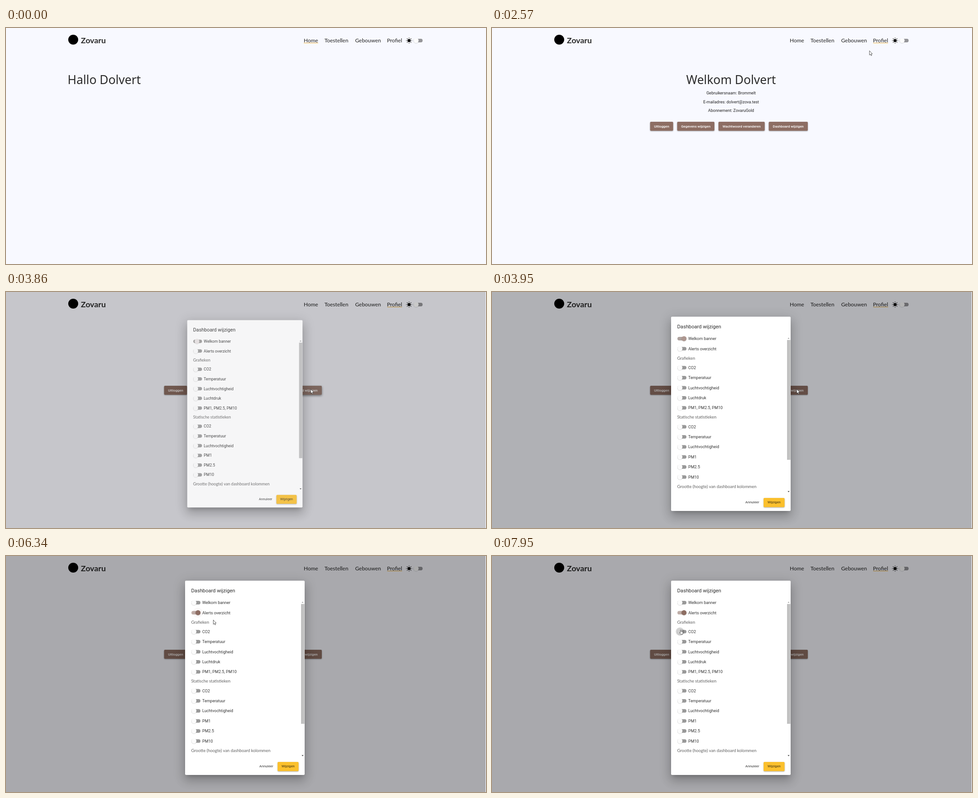
Write an HTML page with a canvas that moves like this. It is 1064 px wide and 526 px high and loops after 8 s.

```html
<!DOCTYPE html>
<html lang="nl">
<head>
<meta charset="utf-8">
<title>Dashboard wijzigen</title>
<style>
html, body { margin: 0; width: 100%; height: 100%; overflow: hidden; background: #f8f9ff; }
canvas { display: block; }
</style>
</head>
<body>
<canvas id="stage" width="1064" height="526"></canvas>
<script>
const ctx = document.getElementById('stage').getContext('2d');
const LOOP = 8000;
const BROWN = [141, 110, 99];
const YELLOW = '#fbc02d';
const SANS = 'Roboto, sans-serif';
const ROUND = 'Lato, sans-serif';
const HEAD = '"Noto Sans", sans-serif';

// Bursts of movement: start, end, number of steps
const BURSTS = [
  [500, 1300, 11], [1380, 1950, 8], [2320, 2320, 1], [2570, 3340, 10], [3680, 4470, 10],
  [4560, 4920, 5], [5110, 5700, 8], [5880, 6610, 10], [6700, 7450, 10], [7510, 7950, 6]
];
const PAGE_AT = 2320, PRESS_AT = 3680, DIALOG_AT = 3771;

// Pointer path: time, x, y
const PATH = [
  [500, 583, 507], [1300, 808, 83], [1380, 820, 64], [1950, 853, 33], [2490, 853, 33],
  [3340, 675, 216], [3950, 675, 216], [4470, 503, 154], [4920, 422, 99], [5280, 422, 99],
  [5700, 420, 121], [5960, 420, 121], [6280, 459, 142], [6610, 461, 148],
  [7450, 421, 175], [7770, 418, 164], [LOOP, 418, 164]
];
const ARROW = new Path2D('M0 0V9.6L2.2 7.6L3.7 11L5.2 10.3L3.8 7.1L6.4 6.8Z');
const HAND = new Path2D('M-1 .8q1-1.4 2 0V4l3 .8q1 .4 1 1.4L4.2 10H.2L-2.8 6.6q-.2-1.2 1.8-.4Z');

const clamp = v => Math.max(0, Math.min(1, v));
const lerp = (a, b, k) => a + (b - a) * k;
const mix = (a, b, k) => a.map((v, i) => Math.round(lerp(v, b[i], k)));
const rgb = (c, a = 1) => `rgba(${c.join(',')},${a})`;

function bezier(x1, y1, x2, y2) {
  const at = (a, b, s) => 3 * s * (1 - s) ** 2 * a + 3 * s * s * (1 - s) * b + s ** 3;
  return x => {
    let lo = 0, hi = 1;
    for (let i = 0; i < 24; i++) {
      const mid = (lo + hi) / 2;
      if (at(x1, x2, mid) < x) lo = mid; else hi = mid;
    }
    return at(y1, y2, lo);
  };
}
const easeFade = bezier(.25, .8, .25, 1);
const easeOpen = bezier(0, 0, .2, 1);

function snap(t) {
  let now = 0;
  for (const [a, b, n] of BURSTS) {
    if (t < a) break;
    const step = n > 1 ? (b - a) / (n - 1) : 1;
    now = Math.min(b, a + Math.floor((t - a) / step + .001) * step);
  }
  return now;
}

function text(str, x, y, font, color = '#212121', align = 'left') {
  ctx.font = font;
  ctx.fillStyle = color;
  ctx.textAlign = align;
  ctx.fillText(str, x, y);
}

function disc(x, y, r, color) {
  ctx.fillStyle = color;
  ctx.beginPath();
  ctx.arc(x, y, r, 0, 7);
  ctx.fill();
}

function box(x, y, w, h, r, color) {
  ctx.fillStyle = color;
  ctx.beginPath();
  ctx.roundRect(x, y, w, h, r);
  ctx.fill();
}

function withShadow(dy, blur, alpha, draw) {
  ctx.save();
  ctx.shadowColor = `rgba(0,0,0,${alpha})`;
  ctx.shadowOffsetY = dy;
  ctx.shadowBlur = blur;
  draw();
  ctx.restore();
}

// k: thumb position, tint: colour progress
function toggle(x, y, k = 0, tint = k) {
  box(x, y - 3.9, 20, 7.8, 3.9, rgb(mix([0, 0, 0], BROWN, tint), lerp(.4, .56, tint)));
  withShadow(.8, 1.6, .16, () =>
    disc(lerp(x + 5.6, x + 14.6, k), y, 5.6, rgb(mix([252, 252, 252], BROWN, tint))));
}

function ripple(t, start, x, y, color) {
  const age = t - start;
  if (age < 0 || age > 480) return;
  disc(x, y, lerp(3, 11.2, clamp(age / 225)), rgb(color, .17 * clamp((480 - age) / 200)));
}

function header(t) {
  disc(149, 26, 11, '#000');
  text('Zovaru', 166, 34, '700 17.8px ' + ROUND, '#2b2b2b');
  const nav = '11.9px ' + ROUND;
  text('Home', 660, 32, nav);
  text('Toestellen', 706, 32, nav);
  text('Gebouwen', 774, 32, nav);
  text('Profiel', 844.5, 32, nav);
  ctx.fillStyle = '#f0b545';
  if (t < PAGE_AT) ctx.fillRect(660, 33, 32, 1);
  if (t > 1860) ctx.fillRect(845, 33, 33, 1);

  disc(893.5, 28, 3.6, '#000');
  for (let i = 0; i < 8; i++) {
    const a = i * Math.PI / 4;
    disc(893.5 + 5.8 * Math.cos(a), 28 + 5.8 * Math.sin(a), .8, '#000');
  }
  toggle(903.5, 28);
}

function button(label, x, w, raised) {
  withShadow(raised ? 2 : 1, raised ? 5 : 2.5, raised ? .5 : .38, () =>
    box(x, 209, w, 20, 2, rgb(BROWN)));
  text(label, x + w / 2, 221.5, '500 7.8px ' + SANS, '#fff', 'center');
}

function profile(t) {
  text('Welkom Dolvert', 530, 125, '26.5px ' + HEAD, '#2b2b2b', 'center');
  ['Gebruikersnaam: Brommelt', 'E-mailadres: dolvert@zova.test', 'Abonnement: ZovaruGold']
    .forEach((line, i) => text(line, 530, 148 + i * 19.6, '9px ' + SANS, '#212121', 'center'));

  const pressed = t >= PRESS_AT && t < 3900;
  button('Uitloggen', 350.5, 51, false);
  button('Gegevens wijzigen', 410.5, 82.5, false);
  button('Wachtwoord veranderen', 502, 102.5, false);
  button('Dashboard wijzigen', 613.5, 86.5, pressed);
  if (pressed) {
    const r = lerp(4, 60, clamp((t - PRESS_AT) / 150));
    ctx.save();
    ctx.beginPath();
    ctx.roundRect(613.5, 209, 86.5, 20, 2);
    ctx.clip();
    disc(676, 218, r, 'rgba(255,255,255,.12)');
    ctx.restore();
  }
}

function dialogShadow(dy, blur, spread, alpha, scale) {
  const away = 2000;
  ctx.save();
  ctx.shadowColor = `rgba(0,0,0,${alpha})`;
  ctx.shadowOffsetX = away * scale;
  ctx.shadowOffsetY = dy;
  ctx.shadowBlur = blur;
  box(397 - spread - away, 55 - spread, 265 + 2 * spread, 433 + 2 * spread, 3, '#000');
  ctx.restore();
}

function triangle(x, y, dir, color) {
  ctx.fillStyle = color;
  ctx.beginPath();
  ctx.moveTo(x - 2.2, y + dir);
  ctx.lineTo(x + 2.2, y + dir);
  ctx.lineTo(x, y - dir);
  ctx.fill();
}

// Entries starting with # are group headings
const ROWS = [
  'Welkom banner', 'Alerts overzicht', '#Grafieken', 'CO2', 'Temperatuur', 'Luchtvochtigheid',
  'Luchtdruk', 'PM1, PM2.5, PM10', '#Statische statistieken', 'CO2', 'Temperatuur',
  'Luchtvochtigheid', 'PM1', 'PM2.5', 'PM10', '#Grootte (hoogte) van dashboard kolommen'
];

function rows(t) {
  const ramp = (start, ms) => clamp((t - start) / ms);
  const states = [
    ms => ramp(3830, ms) - ramp(5110, ms),
    ms => ramp(5860, ms)
  ];
  let y = 104;
  ROWS.forEach((label, i) => {
    const heading = label[0] === '#';
    if (i) y += heading || ROWS[i - 1][0] === '#' ? 21.1 : 22.4;
    if (heading) {
      text(label.slice(1), 410.5, y + 3, '9.4px ' + ROUND, '#606060');
    } else {
      const on = states[i] || (() => 0);
      toggle(411, y, on(80), on(160));
      text(label, 435, y + 3.2, '9px ' + SANS, '#333');
    }
  });
  ripple(t, 5110, 416.6, 104, [0, 0, 0]);
  ripple(t, 5860, 425, 126.4, BROWN);
  ripple(t, 7780, 416.6, 168.5, [0, 0, 0]);
}

function dialog(t) {
  const age = t - DIALOG_AT;
  if (age < 0) return;
  ctx.fillStyle = `rgba(0,0,0,${.32 * easeFade(clamp(age / 400))})`;
  ctx.fillRect(0, 0, 1063, 526);

  const open = easeOpen(clamp(age / 150));
  const scale = lerp(.7, 1, open);
  ctx.save();
  ctx.translate(529.5, 271.5);
  ctx.scale(scale, scale);
  ctx.translate(-529.5, -271.5);
  dialogShadow(6, 8.4, -4, .2, scale);
  dialogShadow(13.4, 21, 1.7, .14, scale);
  dialogShadow(5, 26, 4.5, .12, scale);
  box(397, 55, 265, 433, 2.2, '#fff');

  text('Dashboard wijzigen', 410.5, 81.3, '11.2px ' + SANS, '#2b2b2b');
  rows(t);
  ctx.fillStyle = '#c1c1c1';
  ctx.fillRect(654, 107, 7.5, 267);
  triangle(657.5, 103, 1.2, '#a3a3a3');
  triangle(657.5, 445, -1.2, '#404040');

  text('Annuleer', 577, 471.3, '7.8px ' + SANS, '#333', 'center');
  withShadow(1, 2.5, .35, () => box(602, 459, 46.5, 20.5, 2, YELLOW));
  text('Wijzigen', 625.3, 471.3, '7.8px ' + SANS, '#3d3014', 'center');

  // Fade in from the backdrop tone
  box(397, 55, 265, 433, 2.2, rgb([198, 199, 203], clamp(1.4 * (1 - open))));
  ctx.restore();
}

function pointer(t) {
  if (t < PATH[0][0]) return;
  const i = PATH.findIndex(p => p[0] > t);
  const [ta, xa, ya] = PATH[i - 1], [tb, xb, yb] = PATH[i];
  const k = (t - ta) / (tb - ta);
  const x = lerp(xa, xb, k), y = lerp(ya, yb, k);
  const inDialog = t >= DIALOG_AT;
  const overNav = y < 36 && x > 844;
  const overButton = t > PAGE_AT && !inDialog && y > 208 && y < 229;
  const overToggle = inDialog && x < 431 && [104, 126.4, 168.5].some(c => Math.abs(y - c) < 7);
  const shape = overNav || overButton || overToggle ? HAND : ARROW;
  ctx.save();
  ctx.translate(x + .5, y + .5);
  ctx.fillStyle = '#fff';
  ctx.fill(shape);
  ctx.strokeStyle = '#333';
  ctx.lineWidth = .8;
  ctx.stroke(shape);
  ctx.restore();
}

function draw(t) {
  ctx.fillStyle = '#f8f9ff';
  ctx.fillRect(0, 0, 1064, 526);
  header(t);
  if (t < PAGE_AT) text('Hallo Dolvert', 136.5, 125, '26.5px ' + HEAD, '#2b2b2b');
  else profile(t);
  dialog(t);
  pointer(t);
}

const begin = performance.now();
function tick() {
  draw(snap((performance.now() - begin) % LOOP));
  requestAnimationFrame(tick);
}
tick();
</script>
</body>
</html>
```
